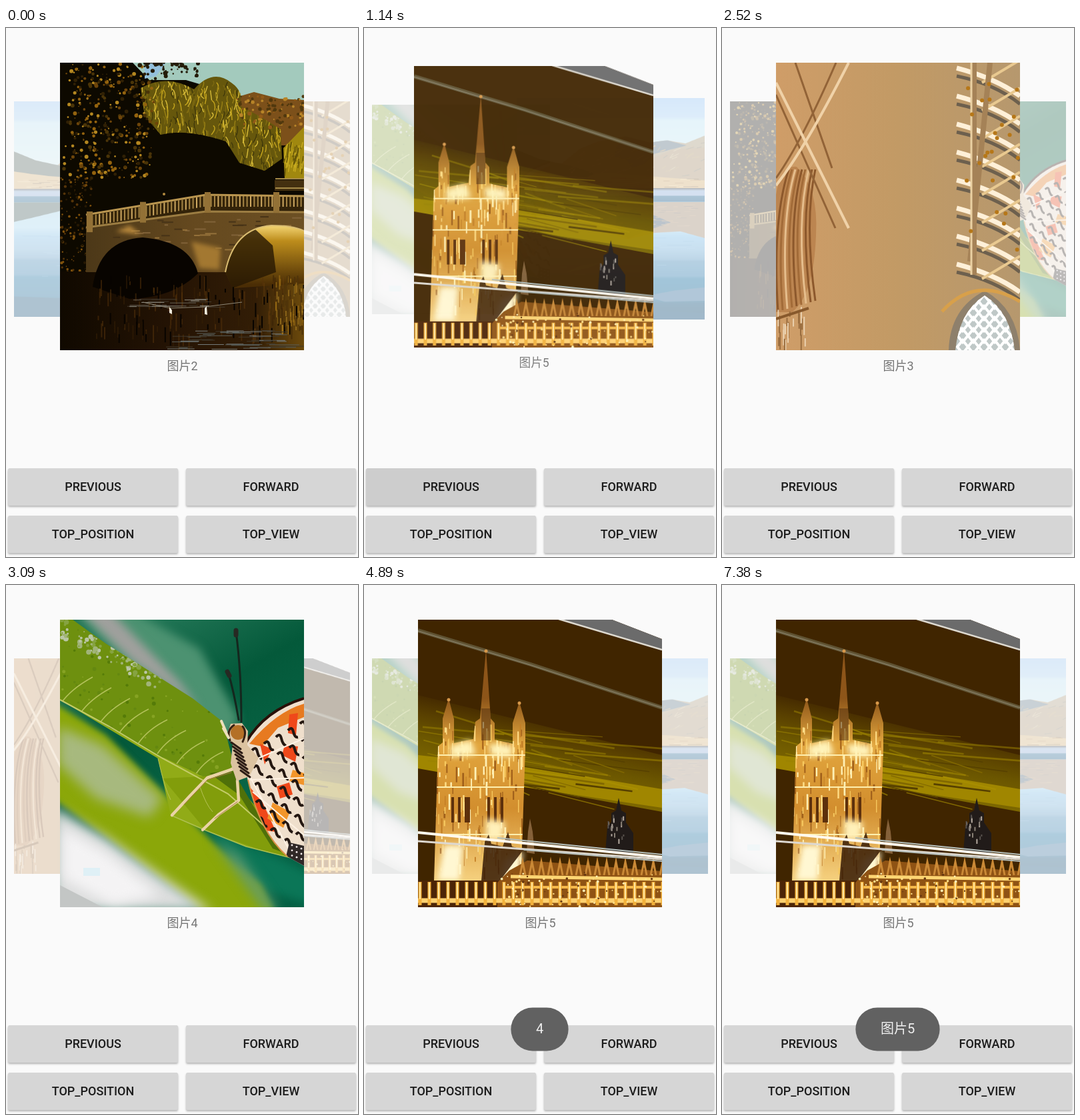
An HTML page with a canvas that plays this animation: 528x793 px, repeating every 7.48 s.

```html
<!DOCTYPE html>
<html lang="zh">
<head>
<meta charset="utf-8">
<style>
html, body { margin: 0; width: 100%; height: 100%; overflow: hidden; background: #fafafa; }
canvas { display: block; width: 528px; height: 793px; }
</style>
</head>
<body>
<canvas id="stage" width="528" height="793"></canvas>
<script>
const ctx = document.getElementById('stage').getContext('2d');
const LOOP = 7480;
const FONT = 'Roboto, "Noto Sans CJK SC", "Noto Sans CJK", sans-serif';
const CARD = { x: 81, y: 52, w: 366, h: 431 };

// The screen refreshes in steps: [first time, number of 120 ms steps]
const TICKS = [[0, 4], [510, 3], [900, 3], [1280, 5], [1910, 1], [2060, 1], [2210, 1], [2360, 1],
  [2520, 1], [2670, 2], [2940, 1], [3090, 1], [3250, 1], [3390, 7], [4230, 3], [4620, 2],
  [4890, 1], [5130, 2], [5400, 3], [5790, 1], [5950, 1], [6100, 1], [7380, 1]]
  .flatMap(([start, n]) => Array.from({ length: n }, (_, i) => start + i * 120));

const SCROLL_MS = 560;
const MOVES = [[100, -1], [740, -1], [1380, -1], [1950, -1], [2530, 1], [3200, 1]];

const BUTTONS = [
  { label: 'PREVIOUS', x: 3, y: 660, taps: [100, 740, 1380, 1950] },
  { label: 'FORWARD', x: 270, y: 660, taps: [2530, 3200] },
  { label: 'TOP_POSITION', x: 3, y: 731, taps: [4230] },
  { label: 'TOP_VIEW', x: 270, y: 731, taps: [5130] }
];
const TOASTS = [
  { text: '4', show: 4540, hide: 5380 },
  { text: '图片5', show: 5600, hide: 9000 }
];

const clamp = v => Math.max(0, Math.min(1, v));
const easeOut = v => 1 - (1 - clamp(v)) ** 2;

function seeded(seed) {
  return () => {
    seed = (seed * 1664525 + 1013904223) >>> 0;
    return seed / 4294967296;
  };
}

// Photos are painted in the coordinates of the resting centre card
function photo(paint) {
  const canvas = document.createElement('canvas');
  canvas.width = CARD.w;
  canvas.height = CARD.h;
  const g = canvas.getContext('2d');
  g.translate(-CARD.x, -CARD.y);
  const rand = seeded(7);
  const pen = {
    g,
    between: (a, b) => a + (b - a) * rand(),
    pick: list => list[Math.floor(rand() * list.length)],
    fill(path, color) { g.fillStyle = color; g.fill(new Path2D(path)); },
    line(path, color, width = 1) {
      g.strokeStyle = color;
      g.lineWidth = width;
      g.stroke(new Path2D(path));
    },
    rect(x, y, w, h, color) { g.fillStyle = color; g.fillRect(x, y, w, h); },
    dot(x, y, r, color) { g.fillStyle = color; g.beginPath(); g.arc(x, y, r, 0, 7); g.fill(); },
    fade(x0, y0, x1, y1, ...stops) {
      const grad = g.createLinearGradient(x0, y0, x1, y1);
      stops.forEach(([at, color]) => grad.addColorStop(at, color));
      return grad;
    },
    within(path, draw) { g.save(); g.clip(new Path2D(path)); draw(); g.restore(); },
    soft(radius, draw) { g.save(); g.filter = `blur(${radius}px)`; draw(); g.restore(); },
    times(n, draw) { for (let i = 0; i < n; i++) draw(i); }
  };
  paint(pen);
  return canvas;
}

function lake({ fill, line, rect, fade, within, between, pick, times }) {
  rect(81, 52, 366, 180, fade(0, 52, 0, 180, [0, '#96c8f8'], [.28, '#a8d4f8'], [.34, '#c0e8fa'], [1, '#d2f1f8']));
  fill('M180 59L215 68L268 86L225 76Z', '#c4e8fb');
  const ridge = 'M165 182L205 150L240 136L292 126L340 138L375 134L410 140L447 125V232H165Z';
  fill(ridge, '#ab9c7e');
  fill('M292 126L276 145L272 166L296 172L305 188L330 180L350 160L412 144L375 134L340 138Z', '#5b7484');
  fill('M318 192L348 168L385 152L447 148V232H318Z', '#ad9674');
  fill('M81 152L125 170L185 183L228 196L240 212H81Z', '#4a5c56');
  within(ridge, () => times(60, () => {
    const x = between(180, 447), y = between(140, 205);
    line(`M${x} ${y}l${between(5, 18)} ${-between(2, 9)}`, pick(['#c8b48c', '#8c8470', '#b89e70']), 1.5);
  }));
  fill('M81 192Q150 203 218 206Q240 193 290 200L447 212V232H81Z', '#d8b478');
  times(75, () => line(`M${between(81, 425)} ${between(207, 225)}h${between(8, 30)}`, pick(['#a87c48', '#f0d49c', '#806440', '#e4c080'])));
  rect(81, 227, 366, 255, fade(0, 227, 0, 482, [0, '#343c48'], [.02, '#8eb4dc'], [.055, '#90b0dc'],
    [.06, '#236898'], [.1, '#145888'], [.11, '#9ed4ec'], [.3, '#a4dcf8'], [.37, '#7cc0ee'], [.47, '#70b0dc'],
    [.54, '#5598c8'], [.56, '#3b86b8'], [.67, '#2679b0'], [.69, '#04679f'], [.84, '#045f94'], [.88, '#024876'], [1, '#023e68']));
  fill('M81 254H222L178 270L112 286L81 293Z', '#3b5858');
  fill('M175 270L205 254H447V324L400 311L350 314L296 327L245 308L205 290Z', '#a38c74');
  fill('M276 284L310 266L340 276L382 294L345 306L298 325L274 302Z', '#4d6478');
  times(70, () => line(`M${between(200, 425)} ${between(258, 304)}h${between(5, 24)}`, pick(['#b89c7c', '#877c70', '#c0a078'])));
  times(45, () => line(`M${between(81, 415)} ${between(320, 402)}h${between(10, 60)}`, pick(['#8cc8f055', '#3c88bc55'])));
  fill('M178 391L205 378L250 370L222 382Z', '#76b2d8');
  fill('M330 437L390 426L447 420V446L370 448Z', '#2d6c9c');
  fill('M81 442L190 446L300 462L447 470V483H81Z', '#024574');
}

function bridge({ fill, line, rect, dot, fade, within, soft, between, pick, times }) {
  rect(81, 52, 366, 431, '#0d0900');
  fill('M190 52H447V112L350 102L270 78L215 78Z', '#a3cabd');
  fill('M208 52H240L225 72L208 76Z', '#94c0dc');
  fill('M345 104L372 96L410 106L447 108V176H375Z', '#7c501a');
  const willow = 'M202 90Q240 68 282 92Q310 60 338 82Q358 96 350 116Q382 132 412 152L414 196L388 214L350 202L330 170Q270 150 232 160L208 132Z';
  fill(willow, '#66570c');
  within(willow, () => times(420, () => {
    const x = between(200, 415), y = between(76, 205);
    line(`M${x} ${y}q${between(-3, 6)} 4 ${between(-5, 5)} ${between(8, 19)}`, pick(['#c4a41c', '#988014', '#40380a', '#d8bc38', '#7c6810']), 1.4);
  }));
  fill('M416 180L447 148V226H418Z', '#a0880f');
  times(50, () => line(`M${between(418, 446)} ${between(170, 205)}l-2 ${between(8, 18)}`, pick(['#c8ac20', '#685808']), 1.5));
  times(380, () => {
    const x = between(81, 205) + between(0, 22), y = between(54, 225);
    dot(x, y, between(.7, 3), pick(['#6d450a', '#94630e', '#b48720', '#302005', '#4a3408']));
  });
  times(100, () => dot(between(345, 447), between(102, 150), between(1, 3), pick(['#925a18', '#b88428', '#50380e'])));
  times(55, () => dot(between(200, 290), 52 + between(0, 5) ** 2, between(1, 3.5), '#241c08'));
  times(150, () => dot(between(81, 128), between(225, 370), between(.7, 2.2), pick(['#553409', '#80520c', '#251803'])));
  rect(81, 365, 366, 118, fade(81, 0, 447, 0, [0, '#100900'], [.45, '#241304'], [.8, '#321d06'], [1, '#6c4a0c']));
  fill('M120 292L300 270L447 274V366H120Z', fade(120, 0, 447, 0, [0, '#4c3818'], [.5, '#65491f'], [1, '#6c5024']));
  times(55, () => rect(between(130, 430), between(282, 340), between(5, 18), 2, pick(['#806238', '#473317', '#94713a'])));
  soft(3, () => {
    fill('M165 305L185 296L203 310Z', '#b8883c');
    fill('M278 320L322 330L320 362L290 360Z', '#a37831');
  });
  fill('M130 388Q140 318 205 314Q276 320 288 368Q250 405 185 406Z', '#080400');
  fill('M329 366Q342 300 398 296Q430 296 447 304V383L340 390Z', fade(0, 297, 0, 385, [0, '#f1d270'], [.25, '#bd8d1c'], [1, '#4a2d05']));
  fill('M329 366Q340 316 374 302L400 326L405 366L340 390Z', '#271803cc');
  line('M329 366Q342 300 398 296Q430 296 447 304', '#dabd72', 2);
  fill('M120 282L300 251L447 251V276L300 276L120 300Z', '#332309');
  times(60, i => {
    const x = 124 + i * 5.4, y = x < 300 ? 282 - (x - 120) * .17 : 252;
    line(`M${x} ${y}v16`, i % 3 ? '#a58444' : '#d0aa62', 2);
  });
  line('M120 280L300 250L447 252', '#ba9650', 3);
  line('M120 299L300 275L447 276', '#9c7d42', 3);
  [125, 205, 302, 405].forEach(x => rect(x - 4, x < 300 ? 276 - (x - 120) * .18 : 246, 9, 31, '#937136'));
  rect(403, 228, 44, 16, '#443010');
  line('M404 226H447M404 240H447', '#a58a48', 2);
  dot(237, 249, 2, '#b48c40');
  times(170, () => {
    const x = between(135, 447);
    line(`M${x} ${between(370, 460)}v${between(5, 28)}`, pick(['#56340b88', '#6b430f66', '#080400', '#38210688']), 2);
  });
  times(70, () => line(`M${between(405, 445)} ${between(370, 450)}v${between(5, 22)}`, pick(['#9f7115aa', '#b98b2888', '#4f340a']), 2));
  times(22, () => line(`M${between(180, 310)} ${between(406, 419)}h${between(10, 45)}`, pick(['#655f54', '#8d8a80', '#443c30'])));
  times(55, () => line(`M${between(240, 410)} ${between(453, 482)}h${between(10, 45)}`, pick(['#575c58', '#3f382c', '#747b7b'])));
  line('M205 411L246 420L298 418L354 411', '#8e8878');
  fill('M245 427V418L249 423V429ZM298 429V420L301 417L302 430Z', '#f0eadc');
}

function vault({ fill, line, rect, dot, fade, within, between, pick, times }) {
  rect(81, 52, 366, 431, fade(81, 0, 447, 0, [0, '#cf9d68'], [.5, '#c29a65'], [1, '#b6986e']));
  fill('M81 250Q88 205 112 208Q145 240 141 310Q138 400 105 426H81Z', '#bc8550');
  times(9, i => line(`M${84 + i * 7} ${425 - i * 2}Q${75 + i * 6} 290 ${100 + i * 5} 212`, pick(['#8c582c', '#e5bd8c', '#a26b38']), 3));
  line('M81 225Q120 170 171 52M81 100L170 300M110 52L165 210', '#926337', 3);
  line('M81 236Q125 180 190 52M81 82L190 300', '#f0d2a8', 4);
  times(8, i => {
    const y = 60 + i * 42;
    line(`M352 ${y}Q410 ${y + 15} 447 ${y + 42}`, '#fff0d8', 7);
    line(`M352 ${y + 12}Q410 ${y + 24} 447 ${y + 54}`, '#6d604e', 5);
    line(`M390 ${y + 22}L447 ${y - 12}`, '#e9c990', 4);
  });
  line('M378 52V370M402 52L372 350', '#a58257', 8);
  line('M374 52V370', '#ead0a2', 3);
  times(24, () => dot(between(360, 444), between(58, 340), 3, '#b67718'));
  fill('M340 483Q342 420 394 394Q442 420 447 483Z', '#8e806c');
  const glass = 'M350 483Q356 425 394 401Q432 425 439 483Z';
  fill(glass, '#bfc8c7');
  within(glass, () => times(30, i => {
    const x = 353 + i % 6 * 16, y = 410 + Math.floor(i / 6) * 17;
    line(`M${x} ${y}l8 -10l8 10l-8 10Z`, '#ffffff', 4);
  }));
  line('M330 425Q380 370 447 410', '#d8a04a', 5);
  times(22, () => line(`M${between(84, 125)} ${between(415, 470)}v${between(8, 30)}`, pick(['#ead0ae', '#996d3f']), 2));
  line('M81 436L130 420', '#88592c', 4);
}

function butterfly({ g, fill, line, rect, dot, fade, within, soft, between, pick, times }) {
  rect(81, 52, 366, 431, fade(200, 52, 440, 470, [0, '#247858'], [.3, '#04593a'], [.65, '#086647'], [1, '#045f43']));
  soft(7, () => {
    fill('M105 40H190L290 95L350 200L330 235L180 120Z', '#4c9271');
    fill('M110 38H155L260 145L290 185L190 115Z', '#a0a09d');
    fill('M300 365L410 410L462 435V480L360 450Z', '#0b7657');
  });
  soft(4, () => fill('M70 175L150 225L265 340L310 385L382 450L405 495H300L245 454L145 376L70 320Z', '#8ba709'));
  soft(9, () => {
    fill('M78 212L145 240L235 320L215 348L135 320L78 268Z', '#a7b97e');
    fill('M70 332L150 378L235 438L310 490H70Z', '#dddede');
    fill('M85 365L150 402L230 465L160 480L85 440Z', '#f4f3f4');
    fill('M310 380L350 405L410 490H390Z', '#609b70');
  });
  fill('M81 450L145 483H81Z', '#c3c6c5');
  rect(116, 424, 25, 12, '#dff0f6');
  fill('M81 172L235 258L333 286L390 350L447 414L360 392L300 368L247 345L228 260Z', '#91ab17');
  const blade = 'M81 52H100L150 88L220 132L280 170L325 205L350 300L333 305L235 258L155 212L81 172Z';
  fill(blade, '#6e900f');
  within(blade, () => {
    times(150, () => dot(between(81, 330), between(65, 285), between(.8, 3), pick(['#557b08', '#86a323', '#648810'])));
    times(9, i => line(`M${82 + i * 29} ${178 + i * 15}q15 -22 ${48 - i} ${-40 + i}`, '#b3c15a', 1.5));
    times(90, () => {
      const x = between(83, 235);
      dot(x, 58 + (x - 81) * .55 + between(-8, 19), between(1, 4), pick(['#a1b479', '#bac6a5', '#86a341']));
    });
  });
  fill('M235 290L333 285L447 414L390 400L300 368Z', '#829d0b');
  fill('M305 282L340 278L385 355L447 413L400 395L350 315Z', '#4f7009');
  line('M81 172L155 212L235 260L333 313L447 414', '#c4cc69', 2);
  line('M247 345L300 368L360 392L447 414', '#afc050', 1.5);
  line('M228 260Q238 305 247 322M290 300Q300 330 310 340', '#b6c256', 1);
  const wing = 'M360 236Q388 188 447 170V421L422 407Q380 370 362 290Z';
  fill(wing, '#efdfcc');
  within(wing, () => {
    fill('M365 238Q405 190 447 178V198L408 214L384 242Z', '#e77a20');
    fill('M365 302L385 326L405 370L380 367ZM425 194L438 192L435 225L423 222ZM381 238L399 246L388 269ZM406 302L425 296L430 314L411 320ZM418 240L438 242L434 265L414 255Z', '#ef481a');
    fill('M400 326L426 340L416 364L392 350ZM430 277L447 282V300L425 294Z', '#f2952a');
    times(7, row => times(5, col => {
      const x = 369 + col * 18 + row * 2, y = 248 + row * 26 - col * 10;
      line(`M${x} ${y}q6 -7 8 2t7 ${between(5, 12)}`, '#241711', 4);
    }));
    line('M364 266L447 230M366 292L447 289M370 310L447 375M362 280L430 407', '#fff2e4', 2);
    fill('M425 386L447 391V421L420 407Z', '#302827');
    times(10, i => dot(429 + i % 3 * 7, 390 + i * 2.6, 1.4, '#f8eeee'));
  });
  line('M360 236Q388 188 447 170', '#291008', 4);
  line('M363 292Q380 370 422 407', '#d99248', 2);
  g.lineCap = g.lineJoin = 'round';
  line('M353 205Q353 130 345 70', '#15271e', 3);
  line('M349 202Q342 160 333 130', '#15271e', 3);
  line('M345 75V68M335 136L332 130', '#272923', 7);
  line('M343 275L302 289L276 316L249 345', '#ead3a6', 4.5);
  line('M347 293L349 323L319 344L295 367', '#ead3a6', 4.5);
  line('M338 281L302 292L267 329M347 325L313 350', '#a77945', 1);
  fill('M337 208L354 207L363 219L362 240L379 259L365 287L346 294L337 267L340 239L331 226Z', '#dcc3a0');
  times(8, i => line(`M${338 + i * 2} ${236 + i * 6}l14 10`, '#2c1c15', 3));
  dot(348, 221, 11, '#b47026');
  line('M342 210Q330 218 336 233M355 212Q362 220 355 235', '#352013', 3);
  line('M330 220L323 204M334 229L326 215', '#eee0ba', 4);
}

function palace({ fill, line, rect, dot, fade, within, soft, between, pick, times }) {
  const sky = 'M81 52H372L447 81V483H81Z';
  fill(sky, '#402500');
  within(sky, () => {
    fill('M81 165L447 255V340L81 273Z', fade(240, 188, 218, 302, [0, '#402500'], [.3, '#594000'], [.58, '#6b5600'], [1, '#806a00']));
    fill('M81 255L250 273L447 306V334L240 303L81 275Z', '#a08600');
    times(42, () => {
      const x = between(81, 330), y = 182 + (x - 81) * .22 + between(0, 90);
      line(`M${x} ${y}l${between(60, 180)} ${between(10, 27)}`, pick(['#806700', '#564000', '#9a810088', '#ad940077']), between(1, 3));
    });
    line('M81 68L250 119L447 184', '#706a4caa', 6);
    line('M81 69L250 120L447 184', '#96917c88', 2);
    fill('M298 52H376L447 81V98Z', '#6b6b6b');
    line('M292 51L447 97', '#ddd9d0', 2.5);
    fill('M362 400L365 363L371 355V342L378 338L382 319L386 338L393 342V356L404 372V403Z', '#211b19');
    times(20, () => line(`M${between(366, 390)} ${between(340, 388)}v${between(3, 8)}`, pick(['#898075', '#56504b', '#b5aaa0']), 2));
    const tower = 'M105 444L111 242L118 236V200L127 170L135 201V237L164 231L167 205L174 200L183 97L190 200L196 207V232L223 238V207L233 175L242 207V246L238 365L235 444Z';
    fill(tower, fade(0, 170, 0, 445, [0, '#8d5519'], [.25, '#e2a63e'], [.6, '#d28e2e'], [1, '#f6d280']));
    within(tower, () => {
      times(210, () => {
        const x = between(107, 241);
        line(`M${x} ${between(205, 425)}v${between(5, 26)}`, pick(['#fff0b4', '#f6c85f', '#a0601b', '#c37e25', '#ffdc85']), between(1, 3));
      });
      [255, 303, 374].forEach(y => line(`M105 ${y}H242`, '#fff0b0', 2));
      times(7, i => rect(131 + i % 3 * 10 + (i > 2 ? 54 : 0) - (i > 5 ? 30 : 0), 318, 4, 38, '#5d300c'));
      rect(176, 185, 14, 48, '#51300f88');
    });
    soft(4, () => {
      fill('M130 241L160 232L168 254L130 258ZM188 238L222 240V258L190 255Z', '#fff3ba');
      fill('M120 390H149L143 443H111ZM212 412L239 399L230 443H204Z', '#fff7d2');
      fill('M183 350L212 356L206 382H183Z', '#fff0b9');
    });
    [[127, 170], [183, 97], [233, 175]].forEach(([x, y]) => dot(x, y + 2, 2.5, '#d7984a'));
    fill('M176 443L181 385L187 374L191 388L208 392L216 370L222 392L239 397L204 443Z', '#3a1e07dd');
    fill('M244 401L246 370L249 350L253 370L256 403Z', '#856139');
    rect(81, 443, 366, 40, '#4c2507');
    fill('M200 446L218 428L245 413L447 429V483H200Z', '#8f5314');
    line('M220 437L447 441', '#ffd673', 5);
    line('M210 453H447', '#f5b94b', 4);
    line('M81 473H447', '#ffd170', 7);
    times(27, i => {
      const x = 84 + i * 14;
      line(`M${x} 445V480`, '#f2b13c', 5);
      line(`M${x} 446v25`, '#ffe5a0', 2);
      if (i > 10) line(`M${x - 4} 435l4 -20l4 20`, '#ca8936', 3);
    });
    times(90, () => dot(between(205, 447), between(430, 482), between(.8, 2), pick(['#fff2b5', '#ffdf88', '#673810'])));
    line('M81 371L250 388L447 408', '#fff9ed', 4);
    line('M81 384L200 393L447 411', '#ddd8d0', 3);
    line('M200 379L447 404M240 397L447 414', '#b6c0bd', 2);
  });
}

const PHOTOS = [lake, bridge, vault, butterfly, palace].map(photo);

function text(label, x, y, font, color) {
  ctx.font = `${font} ${FONT}`;
  ctx.fillStyle = color;
  ctx.textAlign = 'center';
  ctx.fillText(label, x, y);
}

function pill(x, y, w, h, r) {
  ctx.beginPath();
  ctx.roundRect(x, y, w, h, r);
}

function drawCard(index, offset) {
  const far = Math.abs(offset);
  const scale = 1 - .25 * far;
  // Past the side slots a card shrinks against its outer edge
  const shift = far <= 1 ? 115 * offset : Math.sign(offset) * (252 - 183 * scale);
  ctx.save();
  ctx.globalAlpha = clamp(1 - .7 * far);
  ctx.translate(264 + shift, 284);
  ctx.scale(scale, scale);
  ctx.drawImage(PHOTOS[index], -183, CARD.y - 284);
  text(`图片${index + 1}`, .5, 228.5, '18px', '#757575');
  ctx.restore();
}

function drawCarousel(t) {
  const position = MOVES.reduce((sum, [start, dir]) => sum + dir * easeOut((t - start) / SCROLL_MS), 1);
  PHOTOS.map((_, i) => ({ i, offset: ((i - position + 12.5) % 5) - 2.5 }))
    .sort((a, b) => Math.abs(b.offset) - Math.abs(a.offset))
    .forEach(({ i, offset }) => drawCard(i, offset));
}

function drawButton({ label, x, y, taps }, t) {
  ctx.save();
  ctx.shadowColor = 'rgba(0,0,0,.28)';
  ctx.shadowBlur = 3;
  ctx.shadowOffsetY = 2;
  ctx.fillStyle = '#d6d6d6';
  pill(x, y, 255, 56, 2.5);
  ctx.fill();
  ctx.restore();
  ctx.save();
  ctx.clip();
  for (const tap of taps) {
    const age = t - tap;
    if (age <= 0 || age > 560) continue;
    ctx.fillStyle = `rgba(0,0,0,${.09 * clamp((560 - age) / 320)})`;
    ctx.beginPath();
    ctx.arc(x + 127.5, y + 28, 30 + 110 * easeOut(age / 300), 0, 7);
    ctx.fill();
  }
  ctx.restore();
  text(label, x + 127.5, y + 34, '500 18px', '#1c1c1c');
}

function drawToast({ text: label, show, hide }, t) {
  const alpha = clamp((t - show) / 180) * clamp((hide + 180 - t) / 180);
  if (!alpha) return;
  ctx.save();
  ctx.globalAlpha = alpha;
  ctx.font = `20px ${FONT}`;
  const width = ctx.measureText(label).width + 75;
  ctx.fillStyle = '#616161';
  pill(263.5 - width / 2, 633.5, width, 65, 32.5);
  ctx.fill();
  text(label, 263.5, 672, '20px', '#f0f0f0');
  ctx.restore();
}

function frame(now) {
  const time = now % LOOP;
  const t = TICKS.filter(tick => tick <= time).pop() || 0;
  ctx.fillStyle = '#fafafa';
  ctx.fillRect(0, 0, 528, 793);
  drawCarousel(t);
  BUTTONS.forEach(button => drawButton(button, t));
  TOASTS.forEach(toast => drawToast(toast, t));
  requestAnimationFrame(frame);
}
const begin = performance.now();
const play = () => frame(performance.now() - begin);
</script>
<script>
// Restart-free clock measured from page load
(function tick() {
  const raf = window.requestAnimationFrame.bind(window);
  window.requestAnimationFrame = callback => raf(() => callback(performance.now() - begin));
  play();
})();
</script>
</body>
</html>
```
